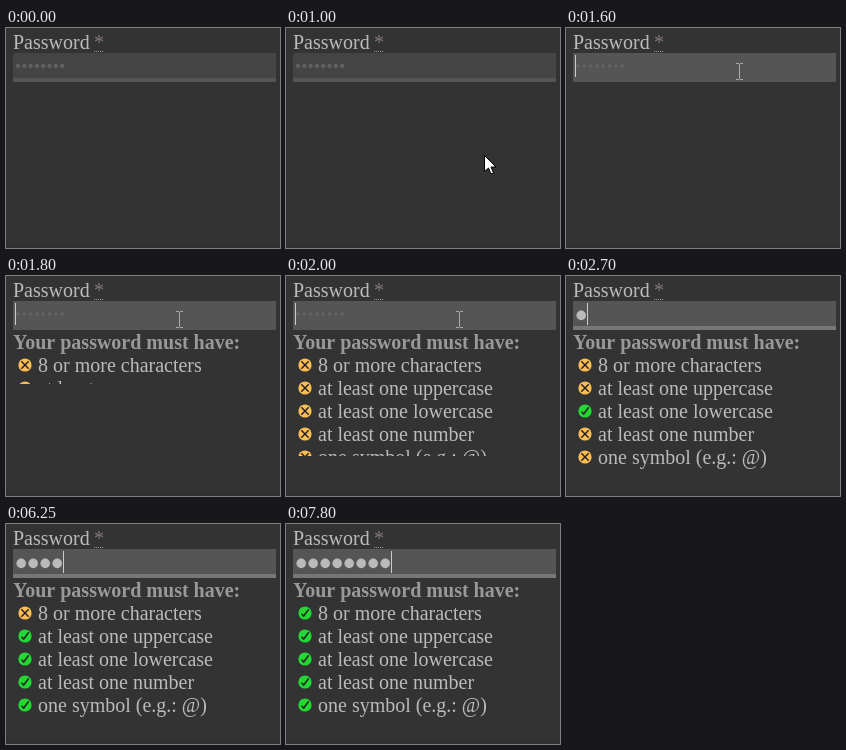
These frames come from a looping animation (274x220 px, 8000 ms). An HTML page with a canvas:

```html
<!DOCTYPE html>
<html lang="en">
<head>
<meta charset="utf-8">
<title>Password rules</title>
<style>
  html, body { margin: 0; width: 100%; height: 100%; overflow: hidden; background: #333; }
  canvas { display: block; }
</style>
</head>
<body>
<canvas id="stage" width="274" height="220"></canvas>
<script>
const ctx = document.getElementById('stage').getContext('2d', { alpha: false });
const LOOP = 8000, FOCUS = 1600;
const SERIF = '20px "Liberation Serif", "Times New Roman", serif';
const KEY_TIMES = [2500, 3800, 5200, 6250, 7100, 7300, 7600, 7800];
const CARET_OFF = [[2150, 2650], [3200, 3750], [4250, 4800], [5350, 5850], [6400, 6900], [7450, 7600]];
const RULES = [
  ['8 or more characters', 7800],
  ['at least one uppercase', 3800],
  ['at least one lowercase', 2500],
  ['at least one number', 6250],
  ['one symbol (e.g.: @)', 5200],
];
const ARROW = [[0, 0], [0, 16], [4, 12.5], [6.5, 18.5], [9, 17.5], [6.5, 11.5], [11.5, 11.5]];
const CROSS = [[[-3.7, -3.7], [3.7, 3.7]], [[3.7, -3.7], [-3.7, 3.7]]];
const CHECK = [[[-3.5, 0.8], [-1.3, 3], [3.8, -3.8]]];

const clamp = v => Math.max(0, Math.min(1, v));

function rect(x, y, w, h, color) {
  ctx.fillStyle = color;
  ctx.fillRect(x, y, w, h);
}

function dot(x, y, r, color) {
  ctx.fillStyle = color;
  ctx.beginPath();
  ctx.arc(x, y, r, 0, Math.PI * 2);
  ctx.fill();
}

function text(str, x, y, color, weight = '') {
  ctx.font = `${weight} ${SERIF}`;
  ctx.fillStyle = color;
  ctx.fillText(str, x, y);
}

function trace(points, dx, dy) {
  ctx.beginPath();
  points.forEach(([x, y]) => ctx.lineTo(x + dx, y + dy));
}

function drawLabel() {
  text('Password', 7, 21, '#bbb');
  text('*', 88, 21, '#857783');
  for (let x = 88; x < 98; x += 2) rect(x, 23, 1, 1, '#999');
}

function drawField(t) {
  const focused = t >= FOCUS;
  const typed = KEY_TIMES.filter(k => t >= k).length;
  const edge = 85 + 34 * clamp((t - KEY_TIMES[0] + 50) / 200) * (typed > 0);
  rect(7, 25, 263, 29, focused ? '#555' : '#444');
  rect(7, 50, 263, 4, `rgb(${edge},${edge},${edge})`);

  if (!typed) {
    for (let i = 0; i < 8; i++) dot(12 + i * 6.3, 38, focused ? 1.7 : 2.2, focused ? '#646464' : '#606060');
  }
  for (let i = 0; i < typed; i++) dot(15.2 + i * 12, 39.4, 4.8, '#bbb');

  const hidden = CARET_OFF.some(([from, to]) => t >= from && t < to);
  if (focused && !hidden) rect(9 + typed * 12, 27, 1, 22, '#ccc');
}

function drawIcon(y, valid) {
  dot(19, y, 6.6, valid ? '#22d832' : '#fdbd55');
  ctx.strokeStyle = '#222';
  ctx.lineWidth = 1.5;
  for (const line of valid ? CHECK : CROSS) {
    trace(line, 19, y);
    ctx.stroke();
  }
}

function drawRules(t) {
  const height = 0.36 * (t - 1650);
  if (height <= 0) return;
  ctx.save();
  ctx.beginPath();
  ctx.rect(0, 54, 274, Math.min(height, 142));
  ctx.clip();
  text('Your password must have:', 7, 73, '#999', 'bold');
  RULES.forEach(([label, validAt], i) => {
    const y = 89 + i * 23;
    drawIcon(y, t >= validAt);
    text(label, 32, y + 7, '#bbb');
  });
  ctx.restore();
}

function drawPointer(t) {
  if (t < 800 || t >= KEY_TIMES[0]) return;
  const left = 1 - clamp((t - 800) / 600);
  const x = Math.round(173 + 89 * left ** 3.14);
  const y = Math.round(43 + 139 * left ** 1.25);
  if (y < 54) {
    rect(x, y - 7, 1, 15, '#aaa');
    for (const end of [-8, 8]) {
      rect(x - 3, y + end, 3, 1, '#aaa');
      rect(x + 1, y + end, 3, 1, '#aaa');
    }
    return;
  }
  trace(ARROW, x + 0.5, y + 0.5);
  ctx.closePath();
  ctx.fillStyle = '#fff';
  ctx.fill();
  ctx.strokeStyle = '#000';
  ctx.lineWidth = 1;
  ctx.stroke();
}

function draw(now) {
  const t = now % LOOP;
  rect(0, 0, 274, 220, '#333');
  rect(0, 215, 274, 5, '#303030');
  drawLabel();
  drawField(t);
  drawRules(t);
  drawPointer(t);
}

let start;
function frame(now) {
  start ??= now;
  draw(now - start);
  requestAnimationFrame(frame);
}
requestAnimationFrame(frame);
</script>
</body>
</html>
```
